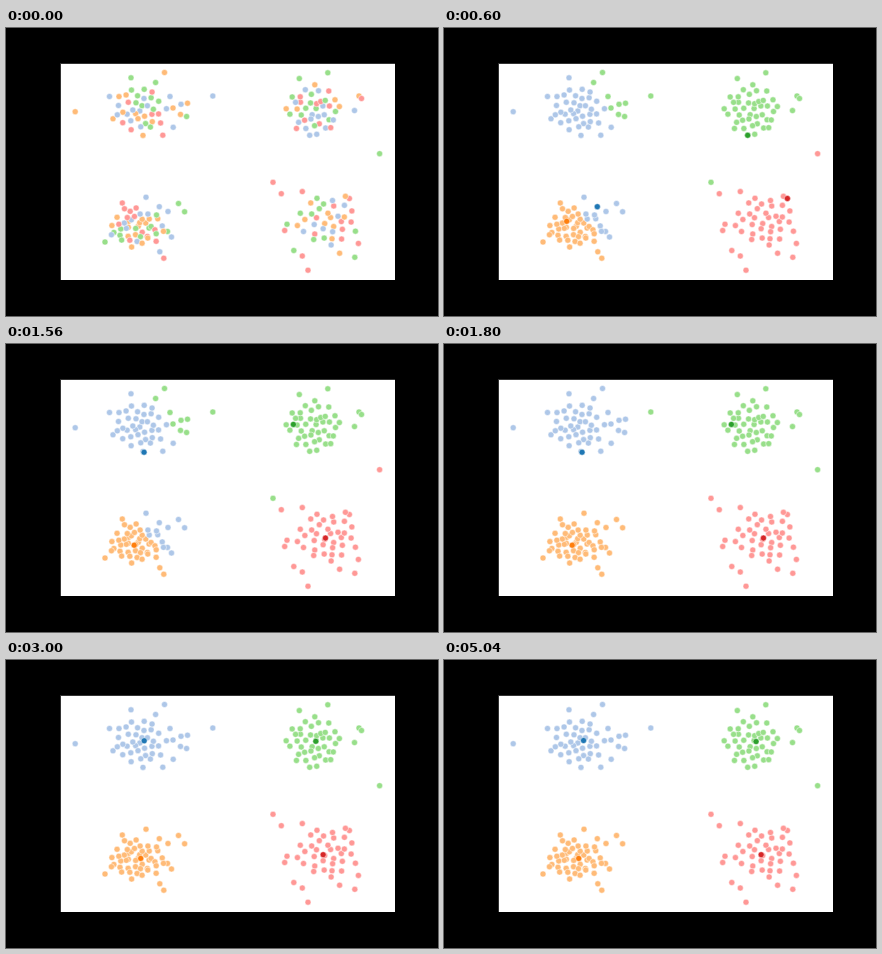
An HTML page with a canvas for the animation above (6 s loop, 432 px wide and 288 px high).

```html
<!DOCTYPE html>
<html lang="en">
<head>
<meta charset="utf-8">
<title>K-means clustering</title>
<style>
  html, body { margin: 0; width: 100%; height: 100%; overflow: hidden; background: #000; }
  canvas { display: block; width: 432px; height: 288px; }
</style>
</head>
<body>
<canvas id="plot" width="432" height="288"></canvas>
<script>
const ctx = document.getElementById('plot').getContext('2d');
const LOOP = 6000, STEP = 600, LAST = 6;
const X_SCALE = 0.68; // horizontal data units per vertical one
const GOLDEN = Math.PI * (3 - Math.sqrt(5));

// Blue, orange, green, red
const LIGHT = ['#aec7e8', '#ffbb78', '#98df8a', '#ff9896'];
const DARK = ['#1f77b4', '#ff7f0e', '#2ca02c', '#d62728'];

const START = [[153.3, 178.7], [122.7, 193.3], [303.7, 107.3], [343.4, 170.5]];

// Outlying points, grouped by their first label
const OUTER = [
  [[103.5, 68.5], [164, 68.5], [206.8, 68], [175, 76.3], [167.2, 99.3], [348.5, 82.6],
   START[2], [140, 169.2], START[0], [162, 183.5], [153.8, 223.8], [165.5, 209]],
  [[158.5, 44.5], [69.2, 83.7], [181.5, 75.2], [174.5, 86.4], [167, 80], [107, 90.8],
   [353, 68], START[1], [333.6, 225.2], [326, 210.8]],
  [[125, 49.8], [149.6, 54.5], [180.6, 88.5], [321.8, 44.8], [293.3, 50.6], [373.6, 125.7],
   [172.5, 175.5], [178.6, 183.8], [99, 214], [161.5, 203.4], [281, 196.2],
   [287.8, 222.5], [348.8, 229.3]],
  [[156.8, 107.2], [355.5, 70.5], [116.3, 175], [157.8, 230.2], [267, 154.3],
   [275.3, 165.7], [296.3, 163.6], START[3], [278.7, 202.5], [296.3, 228],
   [302, 242.2], [352.4, 215.4]]
];

// Dense middles: centre x, y, radii x, y, count
const CORES = [
  [133.8, 82.5, 26, 25, 35], [308.3, 82.3, 28, 26, 39],
  [131.3, 199.1, 28, 21, 44], [321, 191.5, 33, 26, 33]
];

let seed = 20;
function random() {
  seed = (seed * 16807) % 2147483647;
  return seed / 2147483647;
}
const jitter = () => (random() - 0.5) * 4;

// Sunflower spiral, denser towards the middle
function core([cx, cy, rx, ry, count]) {
  return Array.from({ length: count }, (_, i) => {
    const r = ((i + 0.5) / count) ** 0.6, a = i * GOLDEN;
    return {
      x: cx + rx * r * Math.cos(a) + jitter(),
      y: cy + ry * r * Math.sin(a) + jitter(),
      label: Math.floor(random() * 4)
    };
  });
}

const points = [
  ...OUTER.flatMap((list, label) => list.map(([x, y]) => ({ x, y, label }))),
  ...CORES.flatMap(core)
];

function nearest(p, centres) {
  const d = centres.map(([x, y]) => Math.hypot((p.x - x) * X_SCALE, p.y - y));
  return d.indexOf(Math.min(...d));
}

function means(labels) {
  return START.map((_, k) => {
    const group = points.filter((p, i) => labels[i] === k);
    const mean = axis => group.reduce((sum, p) => sum + p[axis], 0) / group.length;
    return [mean('x'), mean('y')];
  });
}

// Steps alternate between relabelling the points and moving the centres
function cluster() {
  let labels = points.map(p => p.label), centres = START;
  const steps = [{ labels, centres: [] }];
  for (let n = 1; n <= LAST; n++) {
    if (n % 2) labels = points.map(p => nearest(p, centres));
    else centres = means(labels);
    steps.push({ labels, centres });
  }
  return steps;
}
const steps = cluster();

function rect(color, x, y, w, h) {
  ctx.fillStyle = color;
  ctx.fillRect(x, y, w, h);
}

function dot(x, y, color) {
  ctx.beginPath();
  ctx.arc(x, y, 3, 0, Math.PI * 2);
  ctx.fillStyle = color;
  ctx.fill();
  ctx.stroke();
}

function draw({ labels, centres }) {
  rect('#000', 0, 0, 432, 288);
  rect('#333', 54, 35, 335, 217);
  rect('#fff', 55, 36, 334, 216);
  ctx.strokeStyle = '#fff';
  ctx.lineWidth = 0.48;
  points.forEach((p, i) => dot(p.x, p.y, LIGHT[labels[i]]));
  centres.forEach(([x, y], k) => dot(x, y, DARK[k]));
}

let shown = -1;
function tick() {
  const step = Math.min(LAST, Math.floor(performance.now() % LOOP / STEP));
  if (step !== shown) draw(steps[shown = step]);
  requestAnimationFrame(tick);
}
tick();
</script>
</body>
</html>
```
